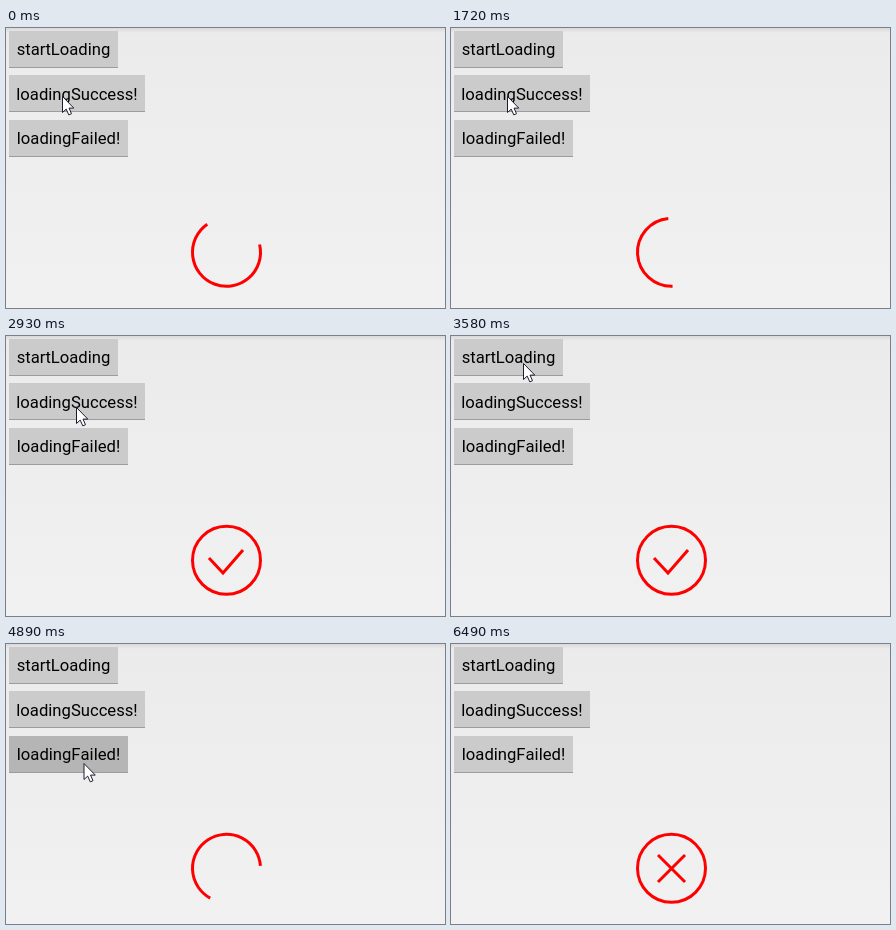
Write an HTML page that moves like this. It is 439x280 px and loops after 6980 ms.

```html
<!DOCTYPE html>
<html lang="en">
<head>
<meta charset="utf-8">
<title>Loading button states</title>
<style>
  html, body { margin: 0; width: 100%; height: 100%; overflow: hidden; background: #f1f1f1; }
  svg { display: block; width: 439px; height: 280px; }
  text { font: 16.65px Roboto, sans-serif; font-kerning: none; text-anchor: middle; }
  .line { fill: none; stroke: #f00; stroke-width: 3; }
</style>
</head>
<body>
<svg viewBox="0 0 439 280">
  <defs>
    <linearGradient id="bg" x2="0" y2="1">
      <stop offset="0" stop-color="#ebebeb"/>
      <stop offset="1" stop-color="#f1f1f1"/>
    </linearGradient>
    <linearGradient id="shade" x2="0" y2="1">
      <stop offset="0" stop-color="#dadada"/>
      <stop offset="1" stop-color="#ebebeb"/>
    </linearGradient>
  </defs>
  <rect width="439" height="280" fill="url(#bg)"/>
  <rect width="439" height="5" fill="url(#shade)"/>
  <g id="buttons"></g>
  <path id="ring" class="line"/>
  <path id="tick" class="line" pathLength="1" d="M203 222L217 237L237 214"/>
  <path id="cross1" class="line" pathLength="1" d="M207 211L234 238"/>
  <path id="cross2" class="line" pathLength="1" d="M234 211L207 238"/>
  <path id="cursor" d="M0 0V16L3.7 12.6L6.3 18.4L9 17.2L6.5 11.6H11.3Z" fill="#fff" stroke="#1c1c30"/>
</svg>
<script>
const LOOP = 6980;
const CX = 220.5, CY = 224.3, R = 34;
const HALF_SPIN = 1390;    // time to grow the arc, and again to shrink it
const FIRST_PHASE = 1.308; // the loop opens while the arc is shrinking
const STALL = 78;          // the spinner hangs briefly on the first press
const RESTART = 3975, STROKE = 200, PRESS = 150;

const BUTTONS = [
  { label: 'startLoading', width: 109, down: RESTART - 85 },
  { label: 'loadingSuccess!', width: 136, down: 1140 },
  { label: 'loadingFailed!', width: 119, down: 4820 }
];
const TICK_AT = (3 - FIRST_PHASE) * HALF_SPIN + STALL;
const CROSS_AT = RESTART + HALF_SPIN;

// Pointer moves: start, duration, destination
const HOME = [56.5, 68.5];
const MOVES = [
  [1720, 510, 57.5, 75.5],
  [2400, 530, 70.5, 71.5],
  [3060, 520, 72.5, 27.5],
  [4050, 700, 78, 119.5],
  [6010, 420, 365.5, 254.5]
];
const POINTER_GONE = 6485;

const $ = id => document.getElementById(id);
const clamp = v => Math.min(1, Math.max(0, v));
const show = (el, on) => el.style.display = on ? '' : 'none';

function make(tag, attrs) {
  const el = document.createElementNS('http://www.w3.org/2000/svg', tag);
  for (const key in attrs) el.setAttribute(key, attrs[key]);
  return $('buttons').appendChild(el);
}

BUTTONS.forEach((button, i) => {
  const { label, width } = button;
  const top = 3 + 44.5 * i, y = Math.floor(top);
  button.face = make('rect', { x: 3, y, width, height: 37 });
  make('rect', { x: 3, y: y + 36, width, height: 1, fill: '#9c9c9c' });
  make('text', { x: 3 + width / 2, y: Math.round(top + 24.2) }).textContent = label;
});

function arc(from, sweep) {
  const at = deg => {
    const rad = deg * Math.PI / 180;
    return `${CX + R * Math.cos(rad)} ${CY + R * Math.sin(rad)}`;
  };
  const half = Math.min(sweep, 359.99) / 2;
  const step = `A${R} ${R} 0 0 1 `;
  return `M${at(from)}${step}${at(from + half)}${step}${at(from + 2 * half)}`;
}

// The head runs three times as fast as the tail, then they swap speeds
function drawRing(phase) {
  const grow = phase % 2, shrink = Math.max(0, grow - 1);
  const tail = 180 * grow + 360 * shrink;
  const head = 540 * grow - 360 * shrink;
  $('ring').setAttribute('d', arc(tail, head - tail));
}

function spinPhase(t) {
  if (t >= RESTART) return Math.min(1, (t - RESTART) / HALF_SPIN);
  const lost = STALL * clamp((t - BUTTONS[1].down) / STALL);
  return Math.min(3, FIRST_PHASE + (t - lost) / HALF_SPIN);
}

function reveal(id, amount) {
  const el = $(id), shown = clamp(amount);
  show(el, shown > 0);
  el.style.strokeDasharray = shown < 1 ? `${shown} 2` : 'none';
}

function drawPointer(t) {
  let [x, y] = HOME;
  for (const [start, duration, toX, toY] of MOVES) {
    const f = clamp((t - start) / duration);
    x += (toX - x) * f;
    y += (toY - y) * f;
  }
  $('cursor').setAttribute('transform', `translate(${x} ${y})`);
  show($('cursor'), t < POINTER_GONE);
}

function draw(t) {
  drawRing(spinPhase(t));
  reveal('tick', t < RESTART ? (t - TICK_AT) / (2 * STROKE) : 0);
  reveal('cross1', (t - CROSS_AT) / STROKE);
  reveal('cross2', (t - CROSS_AT) / STROKE - 1);
  for (const { face, down } of BUTTONS) {
    face.setAttribute('fill', t >= down && t < down + PRESS ? '#b5b5b5' : '#cbcbcb');
  }
  drawPointer(t);
}

const start = performance.now();
function frame() {
  draw((performance.now() - start) % LOOP);
  requestAnimationFrame(frame);
}
frame();
</script>
</body>
</html>
```
